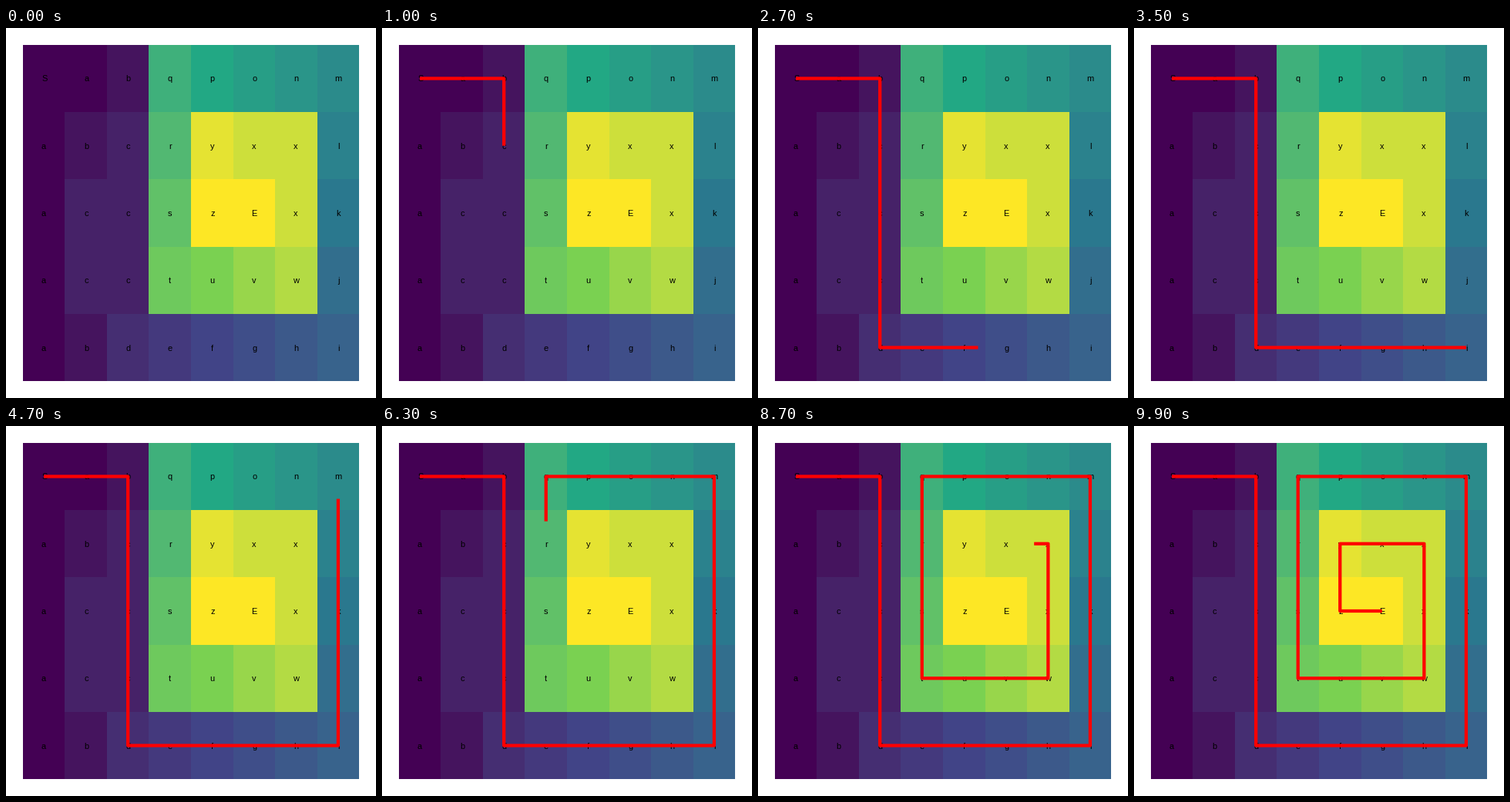
Write a matplotlib script that moves like this. It is 480x480 px and loops after 10 s.

```python
import matplotlib.pyplot as plt
import numpy as np
from matplotlib.animation import FuncAnimation
from matplotlib.textpath import TextPath

SIZE, DPI, FRAMES = 480, 80, 100
FONT, FONT_PX, LINE_PX = "Liberation Sans", 11, 4.27
GRID = ["Sabqponm", "abcryxxl", "accszExk", "acctuvwj", "abdefghi"]
ROWS, COLS = len(GRID), len(GRID[0])
CELLS = {(c, r): ch for r, row in enumerate(GRID) for c, ch in enumerate(row)}

MARGIN = SIZE * 0.05 / 1.1
CELL_W = (SIZE - 2 * MARGIN) / COLS
CELL_H = (SIZE - 2 * MARGIN) / ROWS

# sRGB to XYZ
TO_XYZ = np.array([[0.4125, 0.3576, 0.1804],
                   [0.2127, 0.7152, 0.0722],
                   [0.0193, 0.1192, 0.9503]])
WHITE = TO_XYZ.sum(axis=1)


def px(t):
    return t * 72 / DPI


def height(ch):
    return ord({"S": "a", "E": "z"}.get(ch, ch)) - ord("a")


def center(col, row):
    return MARGIN + (col + 0.5) * CELL_W, MARGIN + (row + 0.5) * CELL_H


def rgb_to_lab(rgb):
    lin = np.where(rgb > 0.04045, ((rgb + 0.055) / 1.055) ** 2.4, rgb / 12.92)
    xyz = lin @ TO_XYZ.T / WHITE
    x, y, z = np.where(xyz > 0.008856, np.cbrt(xyz), 7.787 * xyz + 16 / 116).T
    return 116 * y - 16, 500 * (x - y), 200 * (y - z)


def lab_to_rgb(l, a, b):
    y = (l + 16) / 116
    f = np.stack([y + a / 500, y, y - b / 200], axis=-1)
    xyz = np.where(f ** 3 > 0.008856, f ** 3, (f - 16 / 116) / 7.787) * WHITE
    lin = np.clip(xyz @ np.linalg.inv(TO_XYZ).T, 0, 1)
    return np.where(lin > 0.0031308, 1.055 * lin ** (1 / 2.4) - 0.055, 12.92 * lin)


def cell_colors():
    """Six viridis colours, blended in Lab space by height."""
    ramp = np.linspace(0, 1, 6)
    t = np.array([[height(ch) for ch in row] for row in GRID]) / 25
    lab = rgb_to_lab(plt.get_cmap("viridis")(ramp)[:, :3])
    return lab_to_rgb(*(np.interp(t, ramp, channel) for channel in lab))


def neighbours(cell):
    c, r = cell
    around = [(c + 1, r), (c, r + 1), (c - 1, r), (c, r - 1)]
    return [n for n in around if n in CELLS]


def climb(a, b):
    return height(CELLS[b]) - height(CELLS[a])


def shortest_path():
    """Walk from S to E, never climbing more than one letter per step."""
    find = {ch: cell for cell, ch in CELLS.items()}
    left = {find["E"]: 0}
    queue = [find["E"]]
    for cell in queue:
        for n in neighbours(cell):
            if n not in left and climb(n, cell) <= 1:
                left[n] = left[cell] + 1
                queue.append(n)
    path = [find["S"]]
    while left[path[-1]]:
        here = path[-1]
        path.append(next(n for n in neighbours(here)
                         if left.get(n) == left[here] - 1 and climb(here, n) <= 1))
    return np.array(path)


def advance(ch):
    """Whole-pixel advance width of a letter."""
    one, two = (TextPath((0, 0), s, size=FONT_PX, prop={"family": FONT}).get_extents().width
                for s in (ch, ch + ch))
    return round(two - one)


fig = plt.figure(figsize=(SIZE / DPI, SIZE / DPI), dpi=DPI, facecolor="white")
ax = fig.add_axes([0, 0, 1, 1])
ax.axis("off")
ax.pcolormesh(MARGIN + np.arange(COLS + 1) * CELL_W,
              MARGIN + np.arange(ROWS + 1) * CELL_H,
              cell_colors(), antialiased=False, edgecolors="none")
ax.set_xlim(0, SIZE)
ax.set_ylim(SIZE, 0)

# Letters sit on whole pixels
for cell, ch in CELLS.items():
    x, y = center(*cell)
    ax.text(round(x - advance(ch) / 2), round(y + 4), ch, ha="left", va="baseline",
            color="black", family=FONT, fontsize=px(FONT_PX), zorder=2)

line, = ax.plot([], [], color="red", lw=px(LINE_PX), solid_capstyle="butt",
                solid_joinstyle="round", snap=False, zorder=3)

# Each step of the walk lands on a whole frame
path = shortest_path()
steps = np.arange(len(path))
arrivals = np.round(steps * (FRAMES - 1) / steps[-1])


def update(frame):
    s = np.interp(frame, arrivals, steps)
    shown = np.r_[steps[steps < s], s]
    line.set_data(*center(np.interp(shown, steps, path[:, 0]),
                          np.interp(shown, steps, path[:, 1])))
    return line,


anim = FuncAnimation(fig, update, frames=FRAMES, interval=100,
                     repeat=True, repeat_delay=0, blit=False)
plt.show()
```
